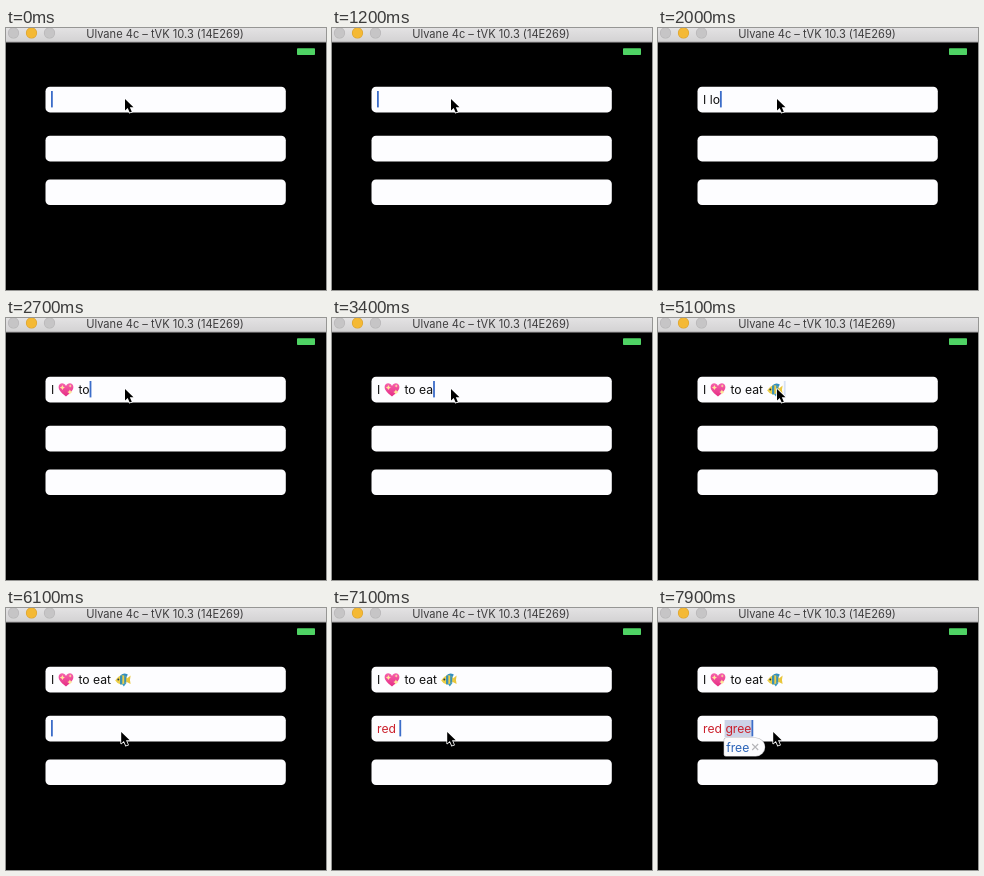
Animation, 320 px wide and 262 px high, one loop 8000 ms. Source, as an HTML page with a canvas:

```html
<!DOCTYPE html>
<html lang="en">
<head>
<meta charset="utf-8">
<title>Text fields</title>
<style>
  html, body { margin: 0; width: 100%; height: 100%; overflow: hidden; background: #000; }
  canvas { display: block; width: 320px; height: 262px; }
</style>
</head>
<body>
<canvas id="stage"></canvas>
<script>
const W = 320, H = 262, LOOP = 8000, STEP = 100;
const canvas = document.getElementById('stage');
const ctx = canvas.getContext('2d');
const scale = window.devicePixelRatio || 1;
canvas.width = W * scale;
canvas.height = H * scale;

const FONT = '12.2px Inter, Roboto, sans-serif';
const LEFT = 45;
const CLICK = 5900;

// '*' stands for the heart and '#' for the fish
const EMOJI = { '*': { draw: heart, w: 17.3 }, '#': { draw: fish, w: 17.3 } };

const first = [
  [0, ''], [1400, 'I'], [1600, 'I '], [1800, 'I l'], [2000, 'I lo'], [2100, 'I lov'],
  [2200, 'I love'], [2300, 'I *'], [2500, 'I * '], [2600, 'I * t'], [2700, 'I * to'],
  [2900, 'I * to '], [3100, 'I * to e'], [3300, 'I * to ea'], [3500, 'I * to eat'],
  [3700, 'I * to eat '], [3900, 'I * to eat f'], [4100, 'I * to eat fi'],
  [4200, 'I * to eat fis'], [4300, 'I * to eat fish'], [4400, 'I * to eat #']
];
const second = [
  [CLICK, ''], [6500, 'r'], [6600, 're'], [6800, 'red'], [7000, 'red '],
  [7200, 'red g'], [7400, 'red gr'], [7500, 'red gre'], [7700, 'red gree']
];
const mouse = [[5100, 119, 71], [5400, 118, 142], [5600, 125, 139], [5900, 115.2, 124]];

function at(keys, t) {
  let cur = [0, ''];
  for (const key of keys) if (key[0] <= t) cur = key;
  return cur;
}

function mouseAt(t) {
  if (t <= mouse[0][0]) return mouse[0].slice(1);
  for (let i = 1; i < mouse.length; i++) {
    const [t0, x0, y0] = mouse[i - 1], [t1, x1, y1] = mouse[i];
    if (t < t1) {
      const p = (t - t0) / (t1 - t0), e = p * p * (3 - 2 * p);
      return [x0 + (x1 - x0) * e, y0 + (y1 - y0) * e];
    }
  }
  return mouse[mouse.length - 1].slice(1);
}

function box(x, y, w, h, r, fill) {
  ctx.beginPath();
  ctx.roundRect(x, y, w, h, r);
  ctx.fillStyle = fill;
  ctx.fill();
}

function disc(x, y, r, fill) {
  ctx.beginPath();
  ctx.arc(x, y, r, 0, Math.PI * 2);
  ctx.fillStyle = fill;
  ctx.fill();
}

function shape(d, fill) {
  ctx.fillStyle = fill;
  ctx.fill(new Path2D(d));
}

function placed(x, y, draw) {
  ctx.save();
  ctx.translate(x, y);
  draw();
  ctx.restore();
}

function heart() {
  const g = ctx.createLinearGradient(0, -7, 0, 7);
  g.addColorStop(0, '#f765ae');
  g.addColorStop(1, '#e52c83');
  shape('M0 6.8C-3 4.6-7.4 1.4-7.4-2.5C-7.4-7.2-1.6-7.6 0-3.6C1.6-7.6 7.4-7.2 7.4-2.5C7.4 1.4 3 4.6 0 6.8Z', g);
  for (const [x, y, r] of [[-3.6, -2, 2.5], [3.9, 2.4, 2.6], [4.2, -3.6, 1.5]])
    placed(x, y, () => {
      ctx.scale(r, r);
      shape('M0-1Q.2-.2 1 0Q.2.2 0 1Q-.2.2-1 0Q-.2-.2 0-1Z', '#ffe59a');
    });
}

function fish() {
  shape('M-3-3Q0-8 5-5L3-1Z', '#338fc0');
  shape('M-2 3L1 7L4 3Z', '#3b9ac5');
  shape('M3 0L7.8-4Q6.6 0 7.8 4.5L3 2Z', '#e9c63b');
  const body = new Path2D('M-7.6 1Q-4-4.8 1-4.2Q4.5-3 5 .7Q2 5 -2 4.8Q-6 4-7.6 1Z');
  ctx.save();
  ctx.fillStyle = '#edcf48';
  ctx.fill(body);
  ctx.clip(body);
  ctx.fillStyle = '#3b91b4';
  ctx.fillRect(-2.8, -6, 2.3, 12);
  ctx.fillRect(1.4, -6, 2, 12);
  ctx.restore();
  disc(-4.5, -.2, 1, '#263b45');
}

// Draws a line of text and returns the x where it ends
function line(text, x, y, color) {
  ctx.font = FONT;
  ctx.fillStyle = color;
  for (const part of text.split(/([*#])/)) {
    const icon = EMOJI[part];
    if (icon) {
      placed(x + 8.3, y - 4.4, icon.draw);
      ctx.fillStyle = color;
      x += icon.w;
    } else {
      ctx.fillText(part, x, y);
      x += ctx.measureText(part).width;
    }
  }
  return x;
}

function blink(t) {
  const p = (t % 1000) / 1000;
  if (p < .5) return 1;
  if (p < .75) return 1 - (p - .5) / .25;
  return p < .85 ? 0 : (p - .85) / .15;
}

function caret(x, y, alpha) {
  ctx.globalAlpha = alpha;
  ctx.fillStyle = '#3c6dc9';
  ctx.fillRect(x, y, 1.8, 16.4);
  ctx.globalAlpha = 1;
}

function pointer(x, y) {
  placed(x, y, () => {
    const p = new Path2D('M0 0V11.5L2.7 9L4.7 13.6L6.8 12.7L4.8 8.2H8.5Z');
    ctx.strokeStyle = '#fff';
    ctx.lineWidth = 1.6;
    ctx.lineJoin = 'round';
    ctx.stroke(p);
    ctx.fillStyle = '#000';
    ctx.fill(p);
  });
}

function titleBar() {
  const g = ctx.createLinearGradient(0, 0, 0, 14);
  g.addColorStop(0, '#e3e2e3');
  g.addColorStop(1, '#d3d2d3');
  ctx.fillStyle = g;
  ctx.fillRect(0, 0, W, 14);
  ctx.fillStyle = '#a9a8a9';
  ctx.fillRect(0, 13.5, W, 1);
  ['#c6c5c6', '#f4b935', '#c6c5c6'].forEach((c, i) => {
    disc(7.5 + 18 * i, 5, 5.6, i === 1 ? '#d9a02f' : '#b5b4b5');
    disc(7.5 + 18 * i, 5, 5, c);
  });
  ctx.font = '11.1px Inter, Roboto, sans-serif';
  ctx.textAlign = 'center';
  ctx.fillStyle = '#3d3c3d';
  ctx.fillText('Ulvane 4c – tVK 10.3 (14E269)', 159, 9.8);
  ctx.textAlign = 'left';
}

function suggestion(x) {
  box(x - .5, 129.5, 41.5, 19, [2, 9.5, 9.5, 2], '#b9b9bd');
  box(x, 130, 40.5, 18, [2, 9, 9, 2], '#fbfbfd');
  line('free', x + 2, 143.6, '#2a63b8');
  ctx.strokeStyle = '#b4b4b8';
  ctx.lineWidth = 1.1;
  ctx.stroke(new Path2D(`M${x + 28} 136l6 6m0-6l-6 6`));
}

function render(t) {
  ctx.setTransform(scale, 0, 0, scale, 0, 0);
  ctx.fillStyle = '#000';
  ctx.fillRect(0, 0, W, H);
  titleBar();
  box(291, 20.3, 18, 6.8, .8, '#4fd364');
  for (const y of [58.8, 107.8, 151.4]) box(39.5, y, 240.3, 25.6, 4.5, '#fdfdff');

  const [time1, text1] = at(first, t);
  const end1 = line(text1, LEFT, 76, '#111');
  if (t < CLICK) {
    caret(end1, 63, blink(t - time1));
  } else {
    const [time2, text2] = at(second, t);
    const open = t >= 7800;
    ctx.font = FONT;
    const word = LEFT + ctx.measureText('red ').width;
    if (open) {
      ctx.fillStyle = '#ccd3e6';
      ctx.fillRect(word - .8, 112, ctx.measureText('gree').width + 1, 17);
    }
    const end2 = line(text2, LEFT, 124.8, t >= 6800 ? '#cb202c' : '#111');
    caret(end2, 112, blink(t - time2));
    if (open) suggestion(word - 1.2);
  }
  pointer(...mouseAt(t));
}

const start = performance.now();
function tick() {
  const t = (performance.now() - start) % LOOP;
  render(Math.floor(t / STEP) * STEP);
  requestAnimationFrame(tick);
}
tick();
</script>
</body>
</html>
```
